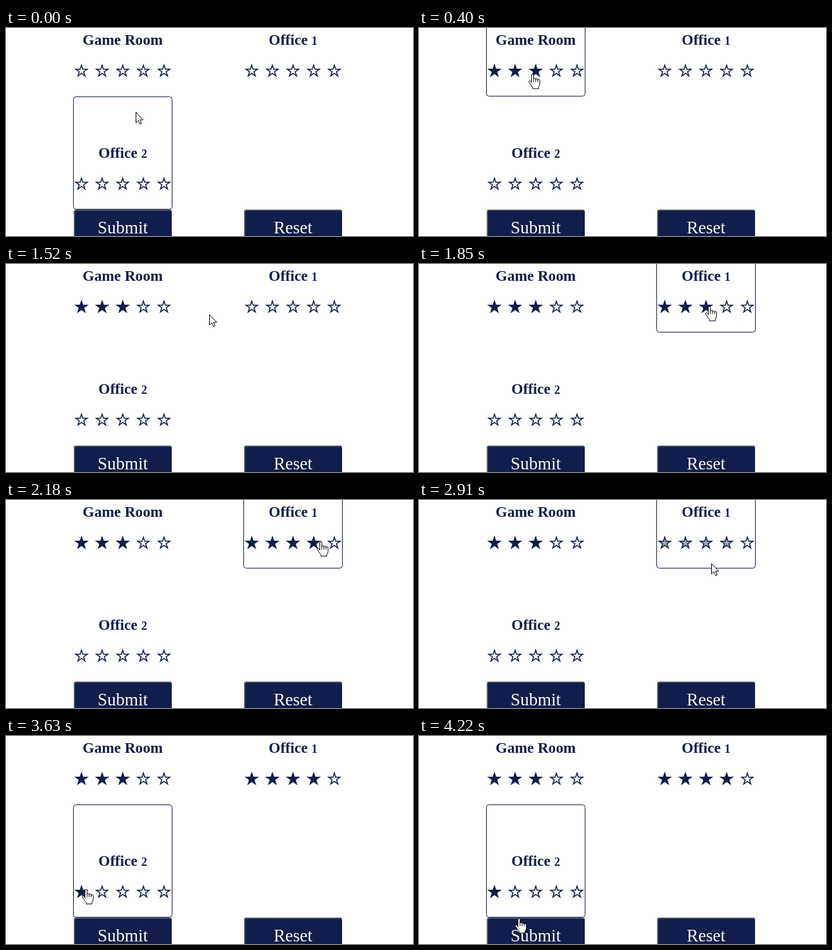
Write an HTML page that moves like this. It is 631x322 px and loops after 4.29 s.

```html
<!DOCTYPE html>
<html lang="en">
<head>
<meta charset="utf-8">
<title>Room ratings</title>
<style>
  html, body { margin: 0; width: 100%; height: 100%; overflow: hidden; background: #fff; }
  svg { display: block; }
  text { font-family: "Playfair Display", "Liberation Serif", serif; text-anchor: middle; }
  .title { font-size: 23.2px; font-weight: 700; fill: #111d4a; }
  .digit { font-size: 18px; }
  .label { font-size: 27px; fill: #fff; }
  .navy { fill: #111d4a; }
  .frame { fill: none; stroke: #111d4a; }
  .bevel { fill: none; stroke: #6f7377; stroke-width: 1.6; }
  .cursor { fill: #fff; stroke: #000; stroke-linejoin: round; }
</style>
</head>
<body>
<svg id="stage" width="631" height="322" viewBox="0 0 631 322">
  <g id="cards"></g>
  <g id="buttons"></g>
  <circle id="click" r="12" fill="#ff0" fill-opacity=".53"/>
  <path id="arrow" class="cursor" d="M.5 .5V16.6L4.2 13.1L6.8 18.8L9.2 17.7L6.7 12.2H11.7Z"/>
  <path id="hand" class="cursor" d="M-1.5 13.5V2a1.6 1.6 0 0 1 3.2 0V8.2
    a1.6 1.6 0 0 1 3.2 .2V9a1.6 1.6 0 0 1 3.2 .3V10a1.6 1.6 0 0 1 3.2 .5V15.5
    q0 2.5-2 5V23H.2V20.6Q-1.8 18.8-3 16.2L-5.5 12.6
    q-.6-1.8 1-2.1q1.3 0 3 3ZM1.7 8.2V12.5M4.9 9V12.5M8.1 10V12.5"/>
</svg>
<script>
  const LOOP = 4290, TICK = 65.9, HOVER_FREEZE = 61;
  const NAVY = '#111d4a', GREY = '#a3a8b3', WHITE = '#fff';
  const CARD_W = 154, CARD_H = 175, STAR_PITCH = 32, STAR_ROW = 135;

  // rating is applied at tick `click`, and the click glow lasts until `release`
  const cards = [
    { x: 104, y: -69, name: 'Game Room', rating: 3, click: 16, release: 18 },
    { x: 368, y: -69, name: 'Office', digit: 1, rating: 4, click: 39, release: 42 },
    { x: 104, y: 106, name: 'Office', digit: 2, rating: 1, click: 58, release: 61 }
  ];

  // pointer route: tick, x, y
  const route = [
    [0, 201, 130], [6, 176, 71], [8, 176, 71], [10, 160, 69], [12, 174, 67], [20, 174, 67],
    [23, 315, 78], [25, 385, 77], [28, 450, 65], [31, 480, 64], [33, 488, 64], [41, 488, 64],
    [44, 453, 98], [49, 189, 258], [53, 131, 241], [55, 124, 237], [60, 124, 237], [64, 155, 282]
  ];

  const byId = id => document.getElementById(id);

  function add(parent, tag, attrs, content = '') {
    const node = document.createElementNS('http://www.w3.org/2000/svg', tag);
    for (const key in attrs) node.setAttribute(key, attrs[key]);
    node.textContent = content;
    return parent.appendChild(node);
  }

  function starPath(cx, cy, radius) {
    const points = Array.from({ length: 10 }, (_, i) => {
      const r = i % 2 ? radius * 0.382 : radius;
      const a = i * Math.PI / 5;
      return (cx + r * Math.sin(a)).toFixed(2) + ' ' + (cy - r * Math.cos(a)).toFixed(2);
    });
    return 'M' + points.join('L') + 'Z';
  }

  function buildCard(card) {
    const { x, y, name, digit } = card;
    const group = byId('cards');
    card.frame = add(group, 'rect', {
      class: 'frame', x: x + .5, y: y + .5, width: CARD_W - 1, height: CARD_H - 1, rx: 4
    });
    const title = add(group, 'text', { class: 'title', x: x + 77, y: y + 95 }, digit ? name + ' ' : name);
    if (digit) add(title, 'tspan', { class: 'digit' }, digit);
    card.stars = Array.from({ length: 5 }, (_, i) => {
      const cx = x + 13 + i * STAR_PITCH, cy = y + STAR_ROW + .7;
      add(group, 'path', { class: 'navy', d: starPath(cx, cy, 11.8) });
      return add(group, 'path', { d: starPath(cx, cy, 6.8) });
    });
  }

  function buildButton(x, text) {
    const group = byId('buttons');
    add(group, 'rect', { class: 'navy', x, y: 281, width: 152, height: 60, rx: 4 });
    add(group, 'path', { class: 'bevel', d: `M${x + .8} 322V285q0-3.2 3.2-3.2H${x + 149}q1.6 0 2.2 1.2` });
    add(group, 'text', { class: 'label', x: x + 76, y: 318 }, text);
  }

  function pointerAt(tick) {
    const next = route.findIndex(key => key[0] > tick);
    if (next < 0) return route[route.length - 1].slice(1);
    const [t0, x0, y0] = route[next - 1], [t1, x1, y1] = route[next];
    const k = (tick - t0) / (t1 - t0);
    return [Math.round(x0 + (x1 - x0) * k), Math.round(y0 + (y1 - y0) * k)];
  }

  const show = (node, on) => node.setAttribute('visibility', on ? 'visible' : 'hidden');

  function draw(time) {
    const tick = Math.floor(time % LOOP / TICK);
    const [px, py] = pointerAt(tick);
    const [hx, hy] = pointerAt(Math.min(tick, HOVER_FREEZE));
    let onStars = false;

    for (const card of cards) {
      const dx = hx - card.x, dy = hy - card.y;
      const inside = dx >= 0 && dx < CARD_W && dy >= 0 && dy < CARD_H;
      const onRow = inside && Math.abs(dy - STAR_ROW) < 32;
      const rated = tick >= card.click ? card.rating : 0;
      const count = onRow ? Math.floor(dx / STAR_PITCH) + 1 : rated;
      const color = inside && !onRow ? GREY : NAVY;
      onStars = onStars || onRow;
      show(card.frame, inside);
      card.stars.forEach((star, i) => star.setAttribute('fill', i < count ? color : WHITE));
    }

    for (const id of ['click', 'arrow', 'hand']) byId(id).setAttribute('transform', `translate(${px} ${py})`);
    show(byId('click'), cards.some(c => tick >= c.click && tick < c.release));
    show(byId('hand'), onStars);
    show(byId('arrow'), !onStars);
  }

  cards.forEach(buildCard);
  buildButton(105, 'Submit');
  buildButton(369, 'Reset');

  const start = performance.now();
  function loop() {
    draw(performance.now() - start);
    requestAnimationFrame(loop);
  }
  loop();
</script>
</body>
</html>
```
